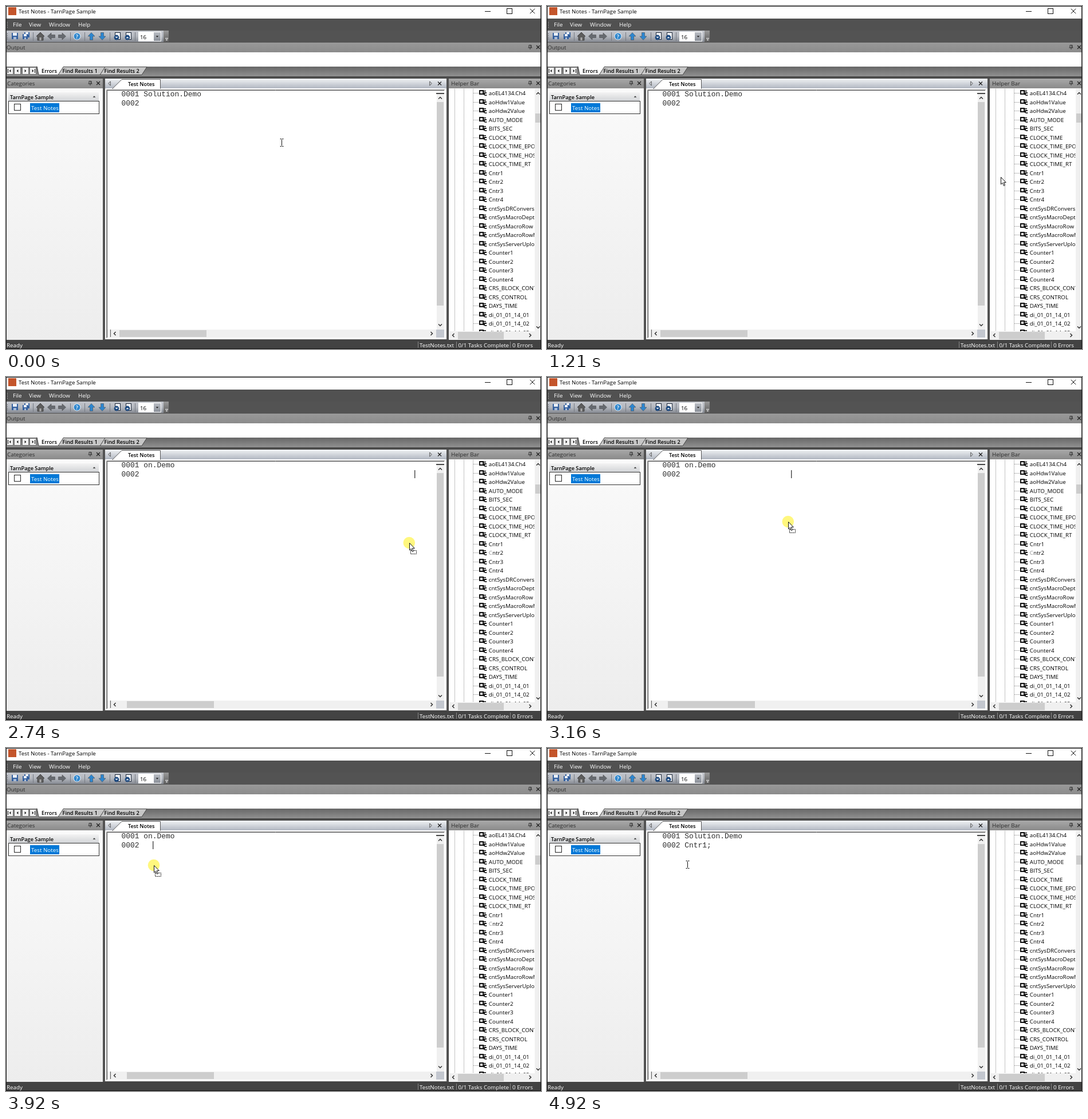
Animation, 934 px wide and 600 px high, one loop 5920 ms. Source, as an HTML page with a canvas:

```html
<!DOCTYPE html>
<html lang="en">
<head>
<meta charset="utf-8">
<title>Test Notes</title>
<style>
html, body { margin: 0; width: 100%; height: 100%; overflow: hidden; background: #fff; }
canvas { display: block; width: 934px; height: 600px; }
</style>
</head>
<body>
<canvas id="stage" width="934" height="600"></canvas>
<script>
const W = 934, H = 600, LOOP = 5920;
const APP = 'TarnPage';
const UI = '9.8px "Open Sans", "Noto Sans", sans-serif';
const BOLD = '600 9.2px "Open Sans", "Noto Sans", sans-serif';
const MONO = '12.92px "Liberation Mono", monospace';
const CHAR = 7.75, TEXT_X = 240.25;
const stage = document.getElementById('stage').getContext('2d');
const backdrop = document.createElement('canvas');
backdrop.width = W;
backdrop.height = H;
let g = backdrop.getContext('2d');

function rect(x, y, w, h, fill) {
  g.fillStyle = fill;
  g.fillRect(x, y, w, h);
}

function shade(x, y, w, h, ...colors) {
  const grad = g.createLinearGradient(0, y, 0, y + h);
  colors.forEach((c, i) => grad.addColorStop(i / (colors.length - 1), c));
  rect(x, y, w, h, grad);
}

function frame(x, y, w, h, color) {
  g.strokeStyle = color;
  g.lineWidth = 1;
  g.strokeRect(x + .5, y + .5, w - 1, h - 1);
}

function text(str, x, y, color = '#000', font = UI) {
  g.font = font;
  g.fillStyle = color;
  g.fillText(str, x, y);
}

function trace(points, closed) {
  g.beginPath();
  points.forEach(([x, y]) => g.lineTo(x, y));
  if (closed) g.closePath();
}

function poly(points, fill, stroke) {
  trace(points, true);
  if (fill) { g.fillStyle = fill; g.fill(); }
  if (stroke) { g.strokeStyle = stroke; g.lineWidth = 1; g.stroke(); }
}

function line(points, color, width = 1) {
  trace(points);
  g.strokeStyle = color;
  g.lineWidth = width;
  g.stroke();
}

function disc(x, y, r, fill) {
  g.beginPath();
  g.arc(x, y, r, 0, 7);
  g.fillStyle = fill;
  g.fill();
}

// Runs draw around (x, y), turned by quarter turns.
function at(x, y, turns, draw) {
  g.save();
  g.translate(x, y);
  g.rotate(turns * Math.PI / 2);
  draw();
  g.restore();
}

const chevron = (x, y, turns) =>
  at(x, y, turns, () => line([[-3, 1.5], [0, -1.5], [3, 1.5]], '#333', 1.5));
const triangle = (x, y, turns, size, fill, stroke) =>
  at(x, y, turns, () => poly([[-size, size / 2], [0, -size / 2], [size, size / 2]], fill, stroke));
const fatArrow = (x, y, turns, color) => at(x, y, turns, () =>
  poly([[0, -6.5], [6, 0], [2.5, 0], [2.5, 6.5], [-2.5, 6.5], [-2.5, 0], [-6, 0]], color, '#4448'));

function cross(x, y, r, color, width = 1.2) {
  line([[x - r, y - r], [x + r, y + r]], color, width);
  line([[x - r, y + r], [x + r, y - r]], color, width);
}

function pin(x, y) {
  line([[x - 2, y + 1], [x - 2, y - 3.5], [x + 2, y - 3.5], [x + 2, y + 1]], '#333');
  line([[x + 1.2, y - 3], [x + 1.2, y + 1]], '#333');
  line([[x - 3.5, y + 1], [x + 3.5, y + 1]], '#333');
  line([[x, y + 1], [x, y + 4]], '#333');
}

function caption(label, x, y, w, closeX) {
  shade(x, y, w, 17, '#a9a9a9', '#8a8a8a');
  text(label, x + (x > 700 ? 4 : 1), y + 11.5, '#2c2c2c');
  pin(closeX - 14, y + 8);
  cross(closeX, y + 8, 3, '#222');
}

function titleAndMenu() {
  rect(0, 0, W, H, '#535353');
  rect(1, 1, W - 2, 21, '#fff');
  rect(4, 2, 14, 14, '#c4552b');
  text(`Test Notes - ${APP} Sample`, 22, 13);
  line([[836, 9.5], [846, 9.5]], '#111');
  frame(874, 4, 10, 10, '#111');
  cross(919, 9, 4.2, '#111', 1);
  rect(1, 22, W - 2, 21, '#515151');
  for (let y = 28; y < 38; y += 3) rect(2, y, 1, 1, '#ccc');
  [['File', 12], ['View', 40], ['Window', 75], ['Help', 126]]
    .forEach(([label, x]) => text(label, x, 35.5, '#fff'));
}

function floppy(x, y, size) {
  rect(x, y, size, size, '#35619f');
  rect(x + 2, y, size - 4, size * .45, '#e8eef7');
  rect(x + 3, y + size * .65, size - 6, size * .35, '#a9bcd8');
}

function sheetIcon(x, turns) {
  rect(x, 46, 10, 13, '#f4f6f9');
  frame(x, 46, 10, 13, '#1c2738');
  disc(x + 3, 55, 4.4, '#1d4a80');
  triangle(x + 3, 55, turns, 2.6, '#fff');
}

function toolbar() {
  shade(1, 43, 276, 20, '#c3c6cc', '#b3b7be', '#858991');
  for (let y = 48; y < 59; y += 3) rect(2, y, 1, 1, '#333');
  floppy(10, 47, 11);
  floppy(32, 46, 9);
  floppy(29, 49, 9);
  [47, 112, 137, 181, 225].forEach(x => rect(x, 46, 1, 15, '#777b83'));
  poly([[60, 46], [67, 53], [65, 53], [65, 60], [55, 60], [55, 53], [53, 53]], '#5d5d5d', '#444');
  rect(58.5, 55, 3, 5, '#aaa');
  fatArrow(79, 53, 3, '#666a70');
  fatArrow(98, 53, 1, '#666a70');
  disc(124, 53, 6.5, '#e4f0fb');
  disc(124, 53, 5.5, '#2f86cc');
  text('?', 121.7, 56.7, '#fff', BOLD);
  fatArrow(149, 53, 0, '#2c86d0');
  fatArrow(168, 53, 2, '#2c86d0');
  sheetIcon(190, 2);
  sheetIcon(209, 0);
  rect(231, 45, 40, 17, '#fff');
  text('16', 234, 57.5);
  shade(258, 46, 12, 15, '#b9bdc4', '#8b9099');
  triangle(264, 53.5, 2, 2.4, '#222');
  shade(275, 43, 9, 20, '#9a9a9a', '#5d5d5d');
  rect(278, 56, 5, 1, '#fff');
  triangle(280.5, 59.5, 2, 2, '#fff');
}

function outputPane() {
  shade(1, 64, W - 2, 17, '#999', '#8b8b8b');
  text('Output', 1, 76, '#2c2c2c');
  pin(915, 72);
  cross(929, 72, 3, '#222');
  rect(1, 81, W - 2, 25, '#fff');
  shade(1, 106, W - 2, 17, '#666', '#919191');
  [1, 14, 28, 41].forEach((x, i) => {
    rect(x, 107, 12, 13, '#f2f2f2');
    frame(x, 107, 12, 13, '#777');
    triangle(x + 6, 113.5, i < 2 ? 3 : 1, 2.6, '#111');
  });
  rect(3, 110, 1, 7, '#111');
  rect(50, 110, 1, 7, '#111');
  const tab = (x, w, fill) =>
    poly([[x, 120.5], [x + 10, 106.5], [x + w, 106.5], [x + w - 9, 120.5]], fill, '#444');
  tab(162, 84, '#c6c6c6');
  tab(89, 84, '#c6c6c6');
  poly([[54, 105], [101, 105], [91, 120.5], [57, 120.5]], '#fff', '#444');
  rect(54, 104, 47, 2, '#fff');
  text('Errors', 62, 117, '#000', BOLD);
  text('Find Results 1', 98.5, 117, '#000', BOLD);
  text('Find Results 2', 171.5, 117, '#000', BOLD);
  rect(1, 123, W - 2, 4, '#4b4b4b');
}

function categoriesPane() {
  caption('Categories', 1, 127, 168, 161);
  shade(1, 144, 168, 440, '#fafafa', '#ededed');
  shade(4, 151, 158, 15, '#f3f3f3', '#d2d4d7');
  text(`${APP} Sample`, 7, 163, '#000', BOLD);
  triangle(154, 158.5, 0, 2.4, '#333');
  rect(4, 166, 159, 23, '#fff');
  frame(4, 166, 159, 23, '#333');
  frame(14, 171, 12, 12, '#222');
  rect(42, 170, 51, 16, '#0078d7');
  text('Test Notes', 44, 181.5, '#fff');
}

function editorPane() {
  shade(173, 127, 596, 18, '#f2f4f6', '#adb3be');
  rect(173, 144, 596, 439, '#fff');
  poly([[186, 144.5], [202, 128.5], [269.5, 128.5], [269.5, 144.5]], '#fff', '#555');
  rect(187, 144, 82, 2, '#fff');
  text('Test Notes', 213, 139.5, '#000', BOLD);
  triangle(180.5, 135.5, 3, 3.6, null, '#555');
  triangle(741.5, 135.5, 1, 3.6, null, '#555');
  cross(757, 135.5, 3, '#222');
  // Sunken edge: dark on the left and top only.
  line([[175.5, 581], [175.5, 146.5], [766, 146.5]], '#a0a0a0');
  line([[176.5, 580], [176.5, 147.5], [765, 147.5]], '#555');
  rect(752, 148, 13, 418, '#f0f0f0');
  rect(751, 148, 14, 6, '#fff');
  rect(751, 152, 14, 2, '#444');
  rect(752, 168, 12, 356, '#cdcdcd');
  chevron(758, 161, 0);
  chevron(758, 558, 2);
  rect(177, 566, 574, 14, '#f0f0f0');
  rect(182, 566, 1, 13, '#555');
  chevron(190, 573, 3);
  chevron(743, 573, 1);
  rect(751, 566, 14, 14, '#c3c7cf');
  [1, 2].forEach(n => text('000' + n, 201.5, 142 + 16 * n, '#2c2c2c', MONO));
}

const VARIABLES = [
  'aoEL4134.Ch4', 'aoHdw1Value', 'aoHdw2Value', 'AUTO_MODE', 'BITS_SEC',
  'CLOCK_TIME', 'CLOCK_TIME_EPOCH', 'CLOCK_TIME_HOST', 'CLOCK_TIME_RT',
  'Cntr1', 'Cntr2', 'Cntr3', 'Cntr4', 'cntSysDRConversion', 'cntSysMacroDepth',
  'cntSysMacroRow', 'cntSysMacroRowMax', 'cntSysServerUpload',
  'Counter1', 'Counter2', 'Counter3', 'Counter4', 'CRS_BLOCK_CONTROL', 'CRS_CONTROL',
  'DAYS_TIME', 'di_01_01_14_01', 'di_01_01_14_02', 'di_01_01_14_03'
];

function variableIcon(y) {
  rect(826, y - 5, 8, 8, '#111');
  rect(828, y - 3, 4, 4, '#fff');
  rect(834, y - 4, 4, 1.5, '#111');
  poly([[832, y + 2], [836, y - 2], [836, y + 5]], '#111');
  rect(836, y - 1, 3, 2, '#111');
  rect(836.5, y + 3, 2.5, 2, '#111');
}

function helperPane() {
  caption('Helper Bar', 773, 127, 160, 929);
  rect(773, 144, 160, 440, '#fff');
  g.save();
  g.beginPath();
  g.rect(774, 145, 148.5, 424);
  g.clip();
  g.setLineDash([1, 1]);
  [783.5, 799.5, 815.5].forEach(x => line([[x, 145], [x, 569]], '#888'));
  VARIABLES.forEach((_, i) => {
    const y = Math.round(152 + i * 15.5) + .5;
    line([[816, y], [825, y]], '#888');
  });
  g.setLineDash([]);
  VARIABLES.forEach((name, i) => {
    const y = Math.round(152 + i * 15.5);
    variableIcon(y);
    text(name, 842.8, y + 4);
  });
  g.restore();
  rect(923, 145, 10, 424, '#f0f0f0');
  rect(924, 188, 9, 16, '#cdcdcd');
  chevron(929, 153, 0);
  chevron(929, 562, 2);
  rect(774, 569, 159, 14, '#f0f0f0');
  rect(789, 570, 80, 13, '#cdcdcd');
  chevron(781, 576, 3);
  chevron(915, 576, 1);
  rect(772, 144, 1, 440, '#444');
}

function statusBar() {
  rect(1, 584, W - 2, 15, '#434343');
  text('Ready', 1, 597, '#fff');
  text('TestNotes.txt', 722, 597, '#fff');
  text('0/1 Tasks Complete', 789.5, 597, '#fff');
  text('0 Errors', 884, 597, '#fff');
  [719, 786, 880].forEach(x => rect(x, 587, 1, 11, '#888'));
  frame(0, 0, W, H, '#111');
}

// Screen updates: bursts of [start, end, number of steps].
const BURSTS = [
  [250, 790, 9], [860, 1410, 9], [1470, 1530, 2], [1670, 1800, 3],
  [2400, 2940, 9], [3010, 3580, 9], [3650, 4190, 9], [4260, 4320, 2]
];

// Pointer path: [time, x, y].
const PATH = [
  [182, 481, 239], [655, 620, 288], [790, 694, 293], [1130, 775, 299.5],
  [1410, 838, 297], [1530, 850, 296], [1800, 852, 293], [2332, 852, 293],
  [2737, 704, 290], [2940, 583, 275], [3152, 421, 253], [3580, 300, 223],
  [3920, 258, 205], [4190, 245, 206], [4320, 244, 205]
];

function snap(t) {
  const burst = BURSTS.filter(b => b[0] <= t).pop();
  if (!burst) return 0;
  const [start, end, count] = burst;
  const step = (end - start) / (count - 1);
  return start + step * Math.min(count - 1, Math.floor((t - start + 6) / step));
}

function pointer(t) {
  const last = PATH.length - 1;
  if (t <= PATH[0][0]) return PATH[0].slice(1);
  if (t >= PATH[last][0]) return PATH[last].slice(1);
  const i = PATH.findIndex(p => p[0] > t) - 1;
  const slope = (k, axis) => {
    const a = PATH[Math.max(0, k - 1)], b = PATH[Math.min(last, k + 1)];
    return (b[axis] - a[axis]) / (b[0] - a[0]);
  };
  const a = PATH[i], b = PATH[i + 1], span = b[0] - a[0], u = (t - a[0]) / span;
  return [1, 2].map(axis =>
    a[axis] * (1 + 2 * u) * (1 - u) ** 2 + b[axis] * u * u * (3 - 2 * u) +
    span * (slope(i, axis) * u * (1 - u) ** 2 - slope(i + 1, axis) * u * u * (1 - u)));
}

function beam(x, y) {
  at(Math.round(x) + .5, Math.round(y), 0, () => {
    line([[0, -5.5], [0, 5.5]], '#111');
    [-6.5, 6.5].forEach(end => {
      line([[-3, end], [-.5, end]], '#111');
      line([[.5, end], [3, end]], '#111');
    });
  });
}

function arrow(x, y, dragging) {
  at(x, y, 0, () => {
    if (dragging) {
      rect(2, 13, 11, 7, '#fff');
      g.setLineDash([2, 1]);
      frame(2, 13, 11, 7, '#111');
      g.setLineDash([]);
    }
    poly([[.5, .5], [.5, 13], [3.3, 10.4], [5.5, 15.5], [7.5, 14.6], [5.3, 9.7], [9.3, 9.7]],
      '#fff', '#111');
  });
}

function draw(t) {
  g = stage;
  g.drawImage(backdrop, 0, 0);
  const [x, y] = pointer(snap(t));
  const dropped = t >= 4860;
  const pressed = t >= 2200 && !dropped;
  const dragging = t >= 2400 && !dropped;
  const scrolled = t >= 2660 && t < 4184;

  text('Solution.Demo'.slice(scrolled ? 6 : 0), TEXT_X, 158, '#2c2c2c', MONO);
  if (dropped) text('Cntr1;', TEXT_X, 174, '#2c2c2c', MONO);
  rect(scrolled ? 211 : 198, 567, 152, 12, '#cdcdcd');
  if (t >= 1670 && !dropped) rect(842, 301, 8, 12, '#fff9');

  if (dragging && x < 752) {
    const column = Math.max(0, Math.round((x - TEXT_X) / 7.6));
    rect(Math.round(TEXT_X + column * CHAR), 163, 1.4, 14, '#444');
  }
  if (pressed) disc(x, y, 10.3, 'rgba(255,240,20,.55)');
  if (dropped) beam(245, 204);
  else if (x < 752 && !dragging) beam(x, y);
  else arrow(Math.round(x), Math.round(y), dragging);
}

[titleAndMenu, toolbar, outputPane, categoriesPane, editorPane, helperPane, statusBar]
  .forEach(paint => paint());

const began = performance.now();
function tick() {
  draw((performance.now() - began) % LOOP);
  requestAnimationFrame(tick);
}
tick();
</script>
</body>
</html>
```
